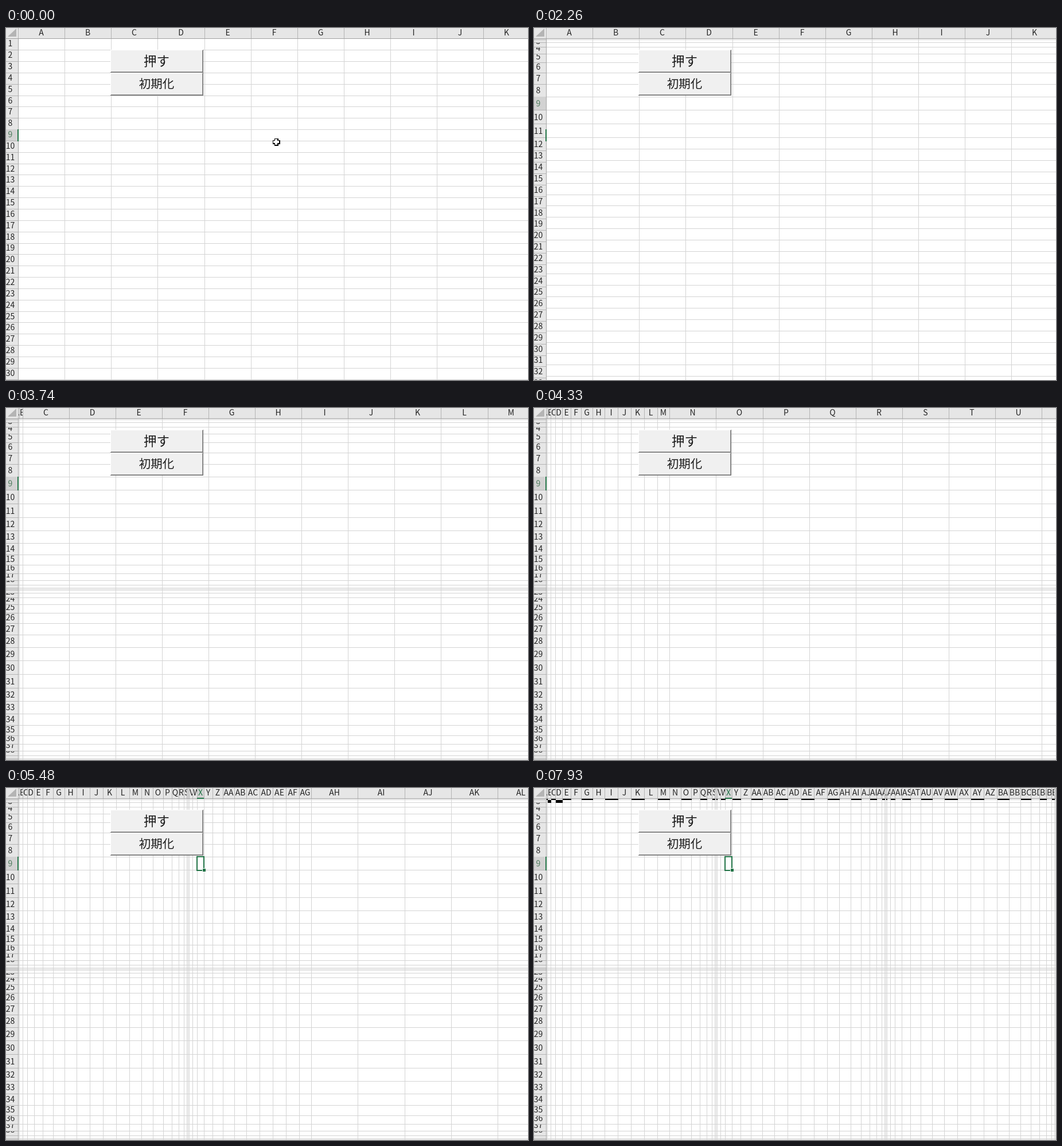
Recreate the animation shown at these times as an HTML page with a canvas. Size 910 px wide and 615 px high, loop 7.99 s.

```html
<!DOCTYPE html>
<html lang="ja">
<head>
<meta charset="utf-8">
<style>
html, body { margin: 0; width: 100%; height: 100%; overflow: hidden; background: #fff; }
canvas { display: block; }
</style>
</head>
<body>
<canvas id="stage" width="910" height="615"></canvas>
<script>
const ctx = document.getElementById('stage').getContext('2d');
const W = 910, H = 615, LOOP = 7990, SEL_ROW = 8, SEL_COL = 23, COLS = 60;
const FONT = '"Noto Sans CJK JP", "Noto Sans CJK", "Noto Sans", sans-serif';
const GREEN = '#217346', HEAD = '#e6e6e6', HEAD_SEL = '#d2d2d2', GRID = '#d4d4d4', EDGE = '#b4b4b4';

// Half of a wave of cell sizes; the other half mirrors it.
const ROWS_AXIS = { start: 18.4, size: 19.84, wave: [2, 5, 8, 12, 15, 18, 20, 22, 23, 24], end: H };
const COLS_AXIS = { start: 21.1, size: 81.1, wave: [2.3, 5.1, 8.4, 12, 15, 18, 20, 21.5, 22.6, 23.1], end: W };

// Progress keys: [time, resized cells]
const ROW_KEYS = [[1749, 0], [1750, 1.6], [2810, 22.2], [3620, 40]];
const COL_KEYS = [[3620, 0], [3740, 2.2], [4860, 22.7], [5480, 33.2], [7070, 60]];
const FILL_KEYS = [[7080, 0], [7930, 64.5], [7990, 69]];
const MOUSE = [[150, 471, 199], [340, 385, 341], [540, 91, 215], [710, 140, 7], [890, 206, 44]];
const PAUSES = [[1750, 1930], [2090, 2260], [2930, 3110], [3960, 4120], [5740, 5860], [6160, 6330]];

function at(keys, t, n = 1) {
  if (t <= keys[0][0]) return keys[0][n];
  for (let i = 1; i < keys.length; i++) {
    const a = keys[i - 1], b = keys[i];
    if (t < b[0]) return a[n] + (b[n] - a[n]) * (t - a[0]) / (b[0] - a[0]);
  }
  return keys[keys.length - 1][n];
}

function edges(axis, done) {
  const list = [axis.start];
  for (let i = 0, p = axis.start; p < axis.end; i++) {
    const j = i % 20;
    p += i < done ? axis.wave[j < 10 ? j : 19 - j] : axis.size;
    list.push(p);
  }
  return list;
}

function rect(color, x, y, w, h) {
  ctx.fillStyle = color;
  ctx.fillRect(x, y, w, h);
}

function clipped(x, y, w, h, draw) {
  ctx.save();
  ctx.beginPath();
  ctx.rect(x, y, w, h);
  ctx.clip();
  draw();
  ctx.restore();
}

function colName(i) {
  const last = String.fromCharCode(65 + i % 26);
  return i < 26 ? last : colName(Math.floor(i / 26) - 1) + last;
}

function drawGrid(xs, ys) {
  rect('#fff', 0, 0, W, H);
  for (const x of xs) rect(GRID, Math.round(x), 18, 1, H);
  for (const y of ys) rect(GRID, 21, Math.round(y), W, 1);
}

function drawRowHead(ys) {
  rect(HEAD, 0, 18, 21, H);
  ctx.font = '300 14px ' + FONT;
  ctx.textAlign = 'center';
  ctx.textBaseline = 'alphabetic';
  for (let i = 0; i < ys.length - 1; i++) {
    const top = Math.round(ys[i]), bottom = Math.round(ys[i + 1]), h = ys[i + 1] - ys[i];
    const selected = i === SEL_ROW;
    if (selected) rect(HEAD_SEL, 0, top, 21, bottom - top);
    clipped(0, top + 1, 21, bottom - top - 1, () => {
      ctx.fillStyle = selected ? '#4d7a5c' : '#222';
      ctx.fillText(i + 1, 7.5, ys[i + 1] - 5.9 - Math.max(0, h - 20) / 4);
    });
    rect(EDGE, 0, bottom, 21, 1);
  }
  rect('#a6a6a6', 21, 18, 1, H);
}

function drawColHead(xs, count) {
  ctx.font = '300 14px ' + FONT;
  ctx.textBaseline = 'alphabetic';
  for (let i = 0; i < Math.min(count, xs.length - 1); i++) {
    const left = Math.round(xs[i]), right = Math.round(xs[i + 1]), w = right - left;
    const selected = i === SEL_COL, name = colName(i);
    rect(selected ? HEAD_SEL : HEAD, left, 0, w + 1, 18);
    rect('#a0a0a0', left, 18, w + 1, 1);
    clipped(left + 1, 0, w - 1, 18, () => {
      const wide = ctx.measureText(name).width > w;
      ctx.textAlign = wide ? 'left' : 'center';
      ctx.fillStyle = selected ? GREEN : '#222';
      ctx.fillText(name, wide ? left + 1 : (left + right) / 2, 12.6);
    });
    rect(EDGE, left, 0, 1, 18);
    rect(EDGE, right, 0, 1, 18);
    if (selected) rect(GREEN, left, 17, w + 1, 2);
  }
}

function drawCorner() {
  rect(HEAD, 0, 0, 21, 18);
  rect('#a0a0a0', 0, 18, 22, 1);
  rect(EDGE, 21, 0, 1, 18);
  ctx.fillStyle = '#b4b4b4';
  ctx.beginPath();
  ctx.moveTo(18, 1);
  ctx.lineTo(18, 15);
  ctx.lineTo(3, 15);
  ctx.fill();
}

function drawSelection(xs, ys) {
  if (xs.length < SEL_COL + 2) return;
  const [l, r] = [xs[SEL_COL], xs[SEL_COL + 1]].map(Math.round);
  const [t, b] = [ys[SEL_ROW], ys[SEL_ROW + 1]].map(Math.round);
  ctx.strokeStyle = GREEN;
  ctx.lineWidth = 2;
  ctx.strokeRect(l, t, r - l, b - t + 1);
  rect('#fff', r - 3, b - 3, 6, 6);
  rect(GREEN, r - 2, b - 2, 5, 5);
}

function drawFill(xs, ys, count) {
  for (let i = 0; i < count; i++) {
    const row = Math.floor(i / COLS), col = i % COLS;
    if ((row + col) % 2 || col + 1 >= xs.length) continue;
    const x = Math.round(xs[col]) + 1, y = Math.round(ys[row]) + 1;
    rect('#000', x, y, Math.round(xs[col + 1]) + 1 - x, Math.round(ys[row + 1]) + 1 - y);
  }
}

function drawButton(label, y, size, pressed) {
  rect('#f0f0f0', 183, y, 161, 40);
  if (pressed) {
    rect('#696969', 182, y, 162, 1);
    rect('#696969', 182, y, 1, 40);
    rect('#fff', 183, y + 39, 161, 1);
    rect('#fff', 343, y + 1, 1, 39);
  } else {
    rect('#fff', 182, y, 162, 1);
    rect('#fff', 182, y, 1, 40);
    rect('#a0a0a0', 183, y + 38, 160, 1);
    rect('#a0a0a0', 342, y + 1, 1, 38);
    rect('#696969', 182, y + 39, 162, 1);
    rect('#696969', 343, y, 1, 40);
  }
  ctx.font = `300 ${size}px ${FONT}`;
  ctx.textAlign = 'center';
  ctx.textBaseline = 'alphabetic';
  ctx.fillStyle = '#1a1a1a';
  ctx.fillText(label, 262.5 + pressed, y + 19 + size * 0.38 + pressed * 0.5);
}

function drawCross() {
  rect('#000', -6, -3, 13, 7);
  rect('#000', -3, -6, 7, 13);
  rect('#fff', -5, -2, 10, 4);
  rect('#fff', -2, -5, 4, 10);
}

function drawArrow() {
  const tip = new Path2D('M0 0V16L4 12.5L6.5 18.5L9 17.5L6.5 11.5H11.5Z');
  ctx.fillStyle = '#fff';
  ctx.fill(tip);
  ctx.strokeStyle = '#000';
  ctx.lineWidth = 1;
  ctx.stroke(tip);
}

function drawSpinner(angle) {
  const ring = (color, from, to) => {
    ctx.strokeStyle = color;
    ctx.beginPath();
    ctx.arc(0, 0, 6.3, from, to);
    ctx.stroke();
  };
  ctx.fillStyle = '#fff';
  ctx.beginPath();
  ctx.arc(0, 0, 6, 0, 7);
  ctx.fill();
  ctx.lineWidth = 4;
  ring('#2a8df0', 0, Math.PI * 2);
  ring('#46b9f7', angle, angle + 1.6);
}

function drawPointer(t) {
  if (t >= 2260) return;
  const x = Math.round(at(MOUSE, t, 1)), y = Math.round(at(MOUSE, t, 2));
  const onButton = x > 182 && x < 344 && y > 38 && y < 118;
  ctx.save();
  ctx.translate(x, y);
  if (t >= 1260) drawSpinner(Math.PI + (Math.min(t, 1500) - 1500) / 120);
  else if (onButton) drawArrow();
  else drawCross();
  ctx.restore();
}

function draw(now) {
  const t = now % LOOP;
  const pause = PAUSES.find(([a, b]) => t >= a && t < b);
  const step = pause ? pause[0] : t;
  const rows = at(ROW_KEYS, step), cols = at(COL_KEYS, step);

  // Headers repaint half a step ahead of the cells.
  const headRows = Math.floor(rows + 0.5), headCols = Math.floor(cols + 0.5);
  const xs = edges(COLS_AXIS, Math.floor(cols)), ys = edges(ROWS_AXIS, Math.floor(rows));
  const headXs = edges(COLS_AXIS, headCols), headYs = edges(ROWS_AXIS, headRows);

  drawGrid(xs, ys);
  drawRowHead(headYs);
  const mark = cols > 0 ? headYs : edges(ROWS_AXIS, 0);
  const markTop = Math.round(mark[SEL_ROW]);
  rect(GREEN, 20, markTop, 2, Math.round(mark[SEL_ROW + 1]) - markTop + 1);

  drawColHead(xs, Infinity);
  if (headCols > Math.floor(cols)) drawColHead(headXs, headCols + 1);
  drawCorner();
  drawFill(xs, ys, Math.floor(at(FILL_KEYS, t)));
  drawSelection(headXs, ys);

  drawButton('押す', 38, 22.5, t >= 1200 && t < 2260);
  drawButton('初期化', 78, 20.5, false);
  drawPointer(t);
}

const begin = performance.now();
function tick() {
  draw(performance.now() - begin);
  requestAnimationFrame(tick);
}
tick();
</script>
</body>
</html>
```
